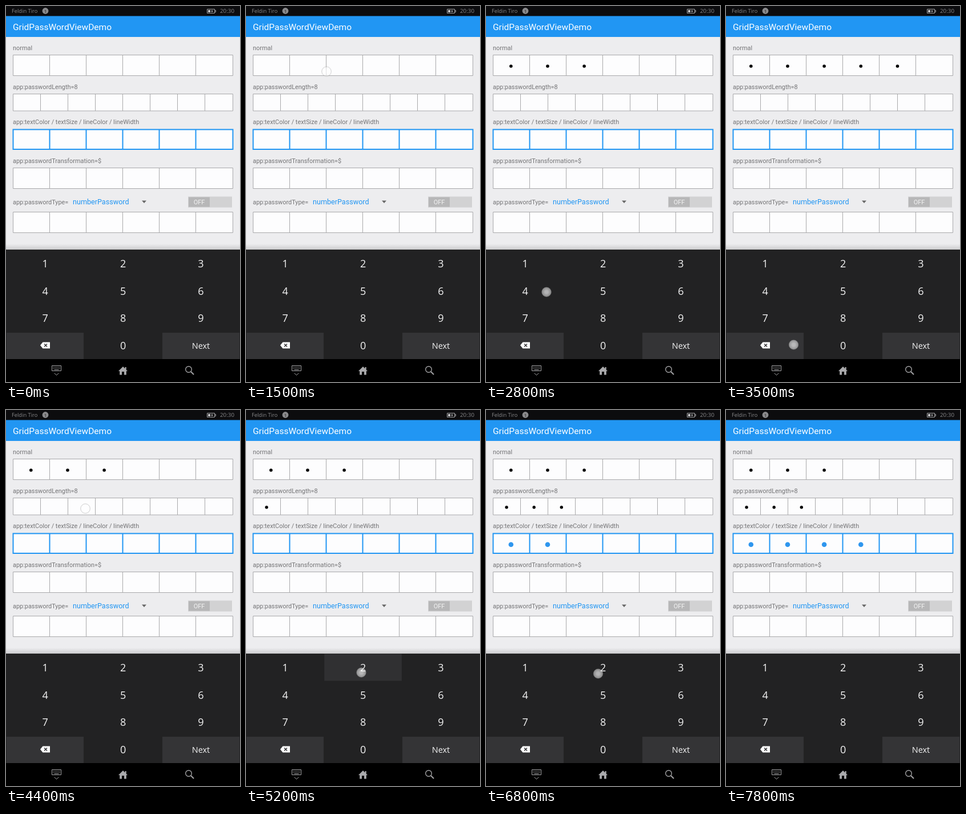
These frames come from a looping animation (410 px wide and 656 px high, 8000 ms). An HTML page:

```html
<!DOCTYPE html>
<html lang="en">
<head>
<meta charset="utf-8">
<title>GridPassWordViewDemo</title>
<style>
  html, body { margin: 0; width: 100%; height: 100%; overflow: hidden; background: #000; }
  svg { display: block; width: 410px; height: 656px; }
  text { font-family: Roboto, sans-serif; }
  .sys { font-family: "Open Sans", "Noto Sans", sans-serif; }
  .label { font-size: 10.9px; fill: #747476; }
  .key { font-size: 18px; fill: #f4f4f4; text-anchor: middle; }
  .status { font-size: 9.3px; fill: #8a8a8c; }
  .cells { fill: #fdfdfe; stroke: #a9a9ab; }
  .cells.blue { stroke: #2196f3; stroke-width: 2; }
  .timed { opacity: 0; }
</style>
</head>
<body>
<svg viewBox="0 0 410 656">
  <defs>
    <linearGradient id="shade" x1="0" y1="0" x2="0" y2="1">
      <stop offset="0" stop-color="#000" stop-opacity="0"/>
      <stop offset="1" stop-color="#000" stop-opacity=".14"/>
    </linearGradient>
    <radialGradient id="glow">
      <stop offset=".3" stop-color="#fff" stop-opacity=".66"/>
      <stop offset="1" stop-color="#fff" stop-opacity=".46"/>
    </radialGradient>
  </defs>

  <rect width="410" height="656" fill="#ededef"/>
  <rect width="410" height="18" fill="#0c0c0e"/>
  <rect y="17.5" width="410" height="36.5" fill="#2196f3"/>

  <g class="status">
    <text class="sys" x="10" y="12">Feldin Tiro</text>
    <circle cx="69" cy="8.5" r="5.4"/>
    <text class="sys" x="69" y="11.6" font-size="8" text-anchor="middle" style="fill:#111">1</text>
    <path d="M352.5 5.5h13v7h-13zM366 7.5h1.5v3H366" fill="none" stroke="#a0a0a2"/>
    <path d="M354 7h4v4h-4zM361.5 6.2l-2.5 3.2h2l-1 2.6 3-3.6h-2z" fill="#c4c4c6"/>
    <text class="sys" x="375" y="12" font-size="9.8">20:30</text>
  </g>
  <text x="12" y="42" font-size="15.5" fill="#fff">GridPassWordViewDemo</text>

  <g class="label">
    <text x="12" y="77">normal</text>
    <text x="12" y="144.5">app:passwordLength=8</text>
    <text x="12" y="206">app:textColor / textSize / lineColor / lineWidth</text>
    <text x="12" y="273.5">app:passwordTransformation=$</text>
    <text x="12" y="345.5">app:passwordType=</text>
  </g>
  <text x="117" y="346" font-size="12.6" fill="#2196f3">numberPassword</text>
  <path d="M238 339.5h8l-4 4.5z" fill="#666"/>
  <rect x="319" y="332.5" width="77" height="19" fill="#d2d2d3"/>
  <rect x="320" y="333.5" width="37" height="17" fill="#b7b7b8"/>
  <text x="338.5" y="346" font-size="11" fill="#f4f4f4" text-anchor="middle">OFF</text>

  <g id="fields"></g>

  <rect y="415" width="410" height="10" fill="url(#shade)"/>
  <rect y="425" width="410" height="191" fill="#222223"/>
  <path d="M1 570h135v46H1zM274 570h135v46H274z" fill="#343436"/>
  <rect y="616" width="410" height="40" fill="#000"/>
  <g id="presses"></g>
  <g id="keys"></g>
  <text class="key sys" x="341.5" y="597.5" style="font-size:14.5px">Next</text>
  <path d="M60 592l4.5-5.5H77v11H64.5z" fill="#fff"/>
  <path d="M67 589.5l5 5m0-5l-5 5" stroke="#343436" stroke-width="1.5"/>

  <g fill="none" stroke="#a2a2a4">
    <path d="M80.5 627.5h16v9h-16zM84.5 640.5l4 3.5 4-3.5"/>
    <path d="M82.5 630h12M82.5 632.3h12" stroke-dasharray="1.4 1.2"/>
    <path d="M84.5 634.6h8"/>
    <circle cx="320" cy="634" r="5.3" stroke-width="1.4"/>
    <path d="M324 638l5 5" stroke-width="2"/>
  </g>
  <path d="M197 637l8-8 3.5 3.5V630h2.2v4.7L213 637h-2.2v6.5H207V638h-4v5.500h-3.800V637z" fill="#aaaaac"/>
  <g id="touches"></g>
</svg>
<script>
const LOOP = 8000;
const byId = id => document.getElementById(id);

function add(parent, tag, attrs, text = '') {
  const el = document.createElementNS('http://www.w3.org/2000/svg', tag);
  for (const k in attrs) el.setAttribute(k, attrs[k]);
  el.textContent = text;
  return byId(parent).appendChild(el);
}

function loop(el, frames) {
  el.animate(frames, { duration: LOOP, iterations: Infinity });
}

// Visible at the given opacity only between from and to.
function show(el, from, to, opacity = 1) {
  el.classList.add('timed');
  const at = (time, value) => ({ offset: time / LOOP, opacity: value, easing: 'step-end' });
  loop(el, [at(0, 0), at(from, opacity), at(to, 0), at(LOOP, 0)]);
}

function touch(from, to, x, y, dx = 0, dy = 0) {
  const el = add('touches', 'circle', {
    cx: x, cy: y, r: 8.3, fill: 'url(#glow)', stroke: '#888', 'stroke-opacity': .4
  });
  show(el, from, to);
  if (dx || dy) loop(el, [
    { offset: 0, transform: 'none' },
    { offset: from / LOOP, transform: 'none' },
    { offset: to / LOOP, transform: `translate(${dx}px,${dy}px)` },
    { offset: 1, transform: `translate(${dx}px,${dy}px)` }
  ]);
}

function press(from, to, x, y) {
  const col = Math.floor(x / 136.7), row = Math.floor((y - 425) / 48);
  const cell = add('presses', 'rect', {
    x: col * 136.7 + .5, y: 425.5 + row * 48, width: 135.7, height: 47, fill: '#303032'
  });
  show(cell, from, from + 100);
  touch(from, to, x, y);
}

// Each field: top, height, cell count, style, dot y, dot radius, dot colour.
const fields = [
  [85.5, 36, 6, '', 105, 2.8, '#000'],
  [153.5, 29.5, 8, '', 169.7, 2.7, '#000'],
  [215.500, 34.5, 6, 'blue', 234.8, 4.3, '#2f96ee'],
  [282.5, 36, 6, ''],
  [359.5, 36, 6, '']
];
for (const [y, h, n, style] of fields) {
  let d = `M12.5 ${y}h385v${h}h-385z`;
  for (let i = 1; i < n; i++) d += `M${Math.round(11.5 + i * 385 / n) + .5} ${y}v${h}`;
  add('fields', 'path', { d, class: 'cells ' + style });
}

function dot(field, i, from, to = LOOP) {
  const [, , n, , cy, r, fill] = fields[field];
  const cx = 12.5 + (i + .5) * 385 / n - (n === 6 ? .8 : .5);
  show(add('fields', 'circle', { cx, cy, r, fill }), from, to);
}

for (let n = 0; n < 10; n++) {
  const i = n ? n - 1 : 10;
  add('keys', 'text', {
    class: 'key sys', x: 68.7 + i % 3 * 136.4, y: 456 + Math.floor(i / 3) * 47.6
  }, n);
}

// Taps that focus a field.
touch(1200, 1600, 138, 115, 4, -1);
touch(4400, 4700, 139, 172, 9, -1);
touch(5800, 6100, 133, 235, 11, 0);

// Key presses: field, start, length, x, y, and when the dot is erased.
const typed = [
  [0, 1800, 300, 100, 460],
  [0, 2100, 300, 199.5, 461],
  [0, 2400, 300, 319, 453],
  [0, 2700, 300, 106, 499, 4100],
  [0, 3000, 300, 219, 506, 3700],
  [1, 4900, 250, 104, 461],
  [1, 5150, 250, 202, 458],
  [1, 5400, 300, 178, 513],
  [2, 6300, 300, 108, 464],
  [2, 6600, 300, 196.5, 460],
  [2, 7000, 300, 264, 487],
  [2, 7400, 300, 262, 489]
];
const filled = [0, 0, 0];
for (const [field, from, len, x, y, erased] of typed) {
  press(from, from + len, x, y);
  dot(field, filled[field]++, from + 150, erased);
}
touch(3500, 3800, 118.5, 591);
touch(3900, 4300, 117, 592);
</script>
</body>
</html>
```
